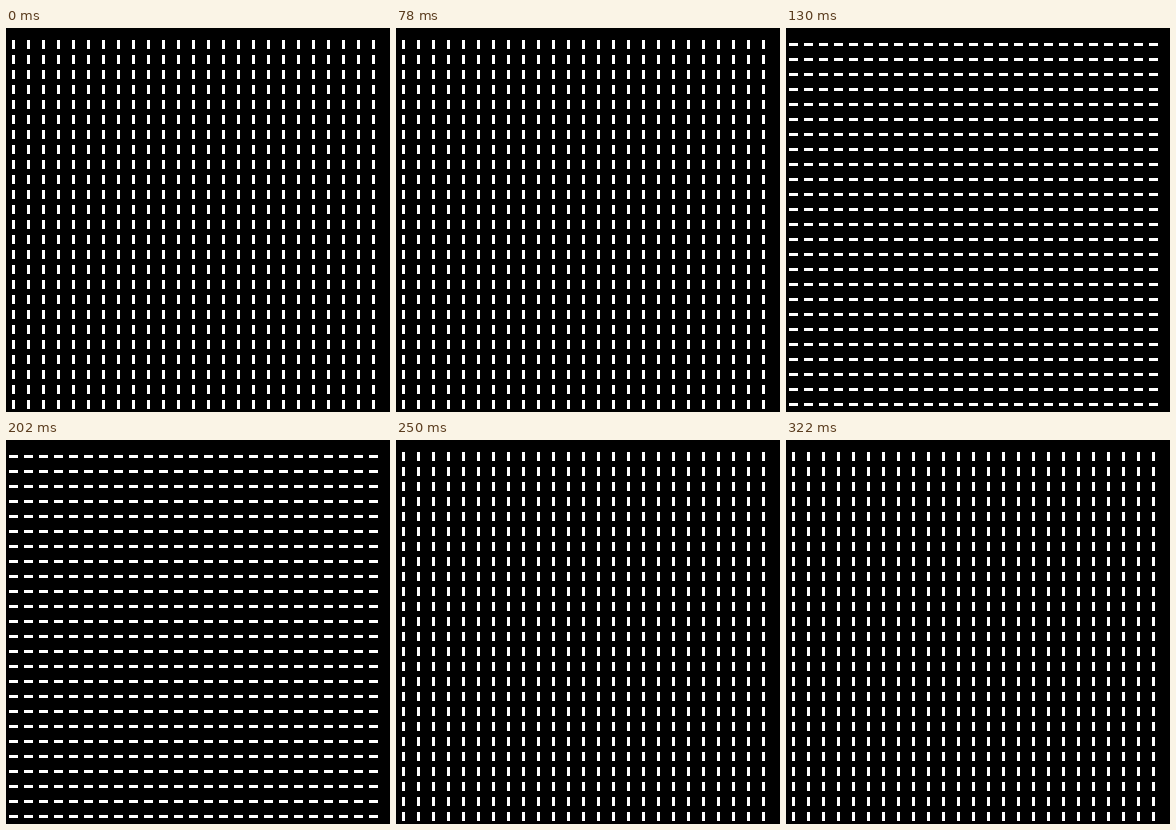
Animation, 384 px wide and 384 px high, one loop 0.37 s. Source, as an HTML page:

```html
<!DOCTYPE html>
<html lang="en">
<head>
<meta charset="utf-8">
<title>Turning dashes</title>
<style>
  html, body { margin: 0; width: 100%; height: 100%; overflow: hidden; background: #000; }
  svg { display: block; width: 100vw; height: 100vh; }
</style>
</head>
<body>
<svg viewBox="0 0 384 384" shape-rendering="crispEdges">
  <rect width="384" height="384" fill="#000"/>
  <path id="dashes" fill="#fff"/>
</svg>
<script>
  const LOOP = 370, FLAT_FROM = 130, FLAT_UNTIL = 250;
  const COUNT = 25, PITCH = 15, LEFT = 7.5, TOP = 16.5;
  const LONG = 9, THICK = 3;
  const dashes = document.getElementById('dashes');

  // One path holding a w by h dash centred on every grid point
  function grid(w, h) {
    let d = '';
    for (let row = 0; row < COUNT; row++) {
      for (let col = 0; col < COUNT; col++) {
        const x = LEFT + col * PITCH - w / 2;
        const y = TOP + row * PITCH - h / 2;
        d += `M${x} ${y}h${w}v${h}h${-w}z`;
      }
    }
    return d;
  }

  const upright = grid(THICK, LONG);
  const flat = grid(LONG, THICK);
  let shown;

  function render(ms) {
    const t = ms % LOOP;
    const shape = t >= FLAT_FROM && t < FLAT_UNTIL ? flat : upright;
    if (shape !== shown) dashes.setAttribute('d', shown = shape);
  }

  const start = performance.now();
  function tick() {
    render(performance.now() - start);
    requestAnimationFrame(tick);
  }
  tick();
</script>
</body>
</html>
```
